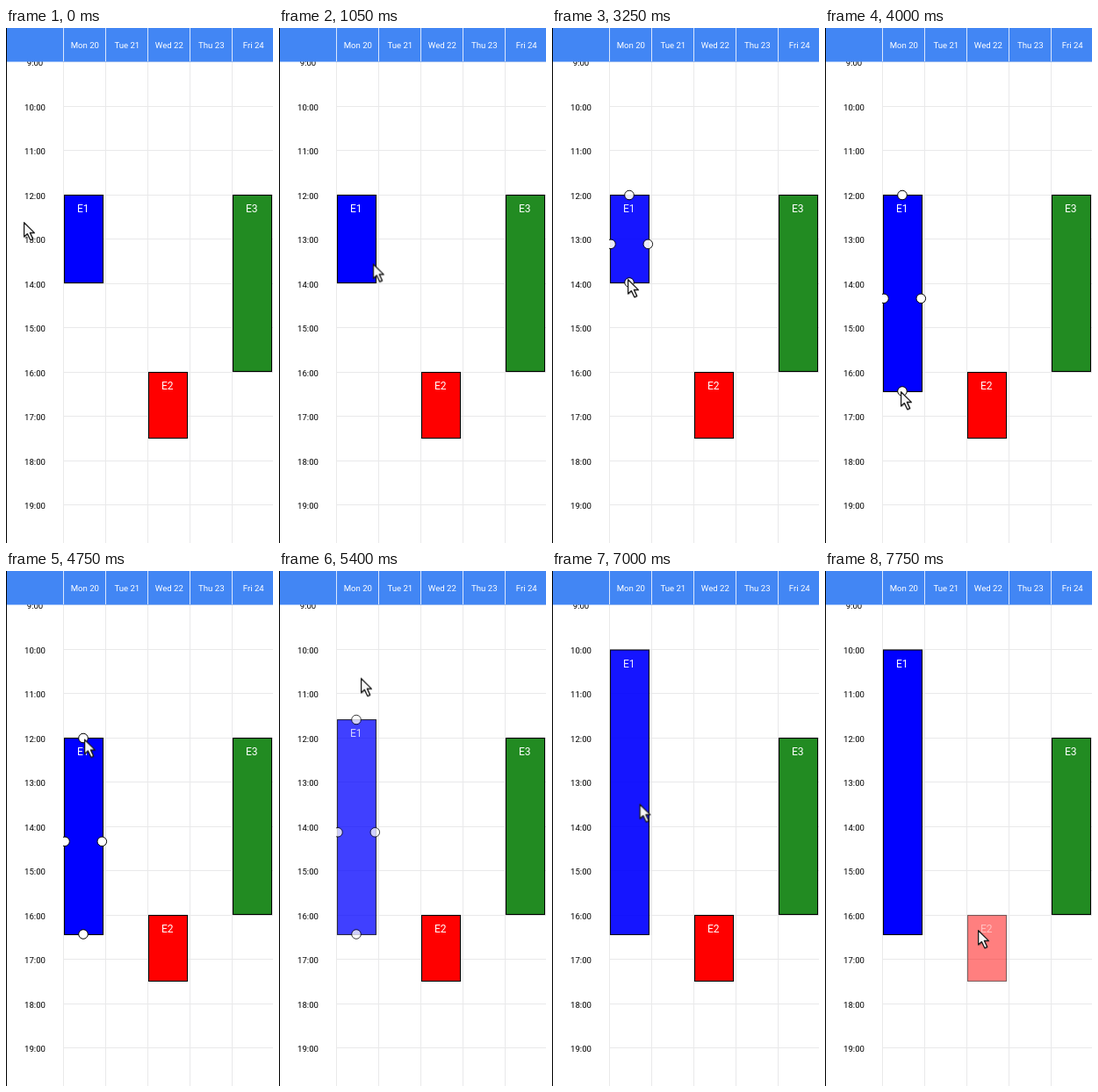
Write an HTML page that moves like this. It is 304x587 px and loops after 8 s.

```html
<!DOCTYPE html>
<html lang="en">
<head>
<meta charset="utf-8">
<title>Week view</title>
<style>
  @property --top { syntax: "<length>"; inherits: true; initial-value: 190.5px; }
  @property --bottom { syntax: "<length>"; inherits: true; initial-value: 290.5px; }
  @property --fade { syntax: "<number>"; inherits: true; initial-value: 1; }

  html, body { margin: 0; width: 100%; height: 100%; overflow: hidden; background: #fff; }
  svg { display: block; width: 304px; height: 587px; }
  text { font-family: Roboto, sans-serif; font-size: 9.6px; text-anchor: middle; }

  .lines { stroke: #e9e9ea; }
  .separators { stroke: #dbe7fd; }
  .event > * { opacity: var(--fade); }
  .event text { font-size: 12px; fill: #fff; }
  .frame { fill: none; stroke: #000; stroke-width: 1.1; }

  #e1 {
    animation: resize-top 8s infinite, resize-bottom 8s linear infinite, press-e1 8s linear infinite;
  }
  #e1 rect { y: var(--top); height: calc(var(--bottom) - var(--top)); }
  #e1 text { transform: translateY(calc(var(--top) - 190.5px)); }
  #e2 { animation: press-e2 8s linear infinite; }

  .handles { animation: editing 8s step-end infinite; }
  .handles circle { r: 5.3px; fill: #fff; stroke: #000; opacity: var(--fade); }
  .north { cy: var(--top); }
  .south { cy: calc(var(--bottom) - 0.5px); }
  .side { cy: calc((var(--top) + var(--bottom)) / 2 + 5.8px); }

  #cursor { animation: point 8s ease-in-out infinite; }

  @keyframes resize-top {
    0%, 65.625% { --top: 190.5px; animation-timing-function: ease-in; }
    67.5% { --top: 170px; animation-timing-function: ease-out; }
    71%, 100% { --top: 90px; }
  }
  @keyframes resize-bottom {
    0%, 41.25% { --bottom: 290.5px; animation-timing-function: ease-in-out; }
    46.9%, 100% { --bottom: 414.5px; }
  }
  @keyframes press-e1 {
    0%, 16.25% { --fade: 1; }
    20.625%, 28.75% { --fade: .5; }
    33.1%, 40% { --fade: 1; }
    43.75%, 46.25% { --fade: .5; }
    50%, 65.625% { --fade: 1; }
    69.375%, 73.125% { --fade: .5; }
    76.875%, 80.625% { --fade: 1; }
    84.375% { --fade: .5; }
    88.125%, 100% { --fade: 1; }
  }
  @keyframes press-e2 {
    0%, 93.75% { --fade: 1; }
    96.875%, 100% { --fade: .5; }
  }
  @keyframes editing {
    0% { visibility: hidden; }
    29.375% { visibility: visible; }
    84.375%, 100% { visibility: hidden; }
  }
  @keyframes point {
    0%, 6.875% { transform: translate(20px, 221px); }
    11.5% { transform: translate(129px, 284px); }
    15%, 30.6% { transform: translate(79px, 249px); }
    35%, 40% { transform: translate(86px, 282px); }
    40.625% { transform: translate(86px, 286px); }
    46.25%, 51.875% { transform: translate(86px, 414px); animation-timing-function: ease-in; }
    55.6% { transform: translate(110px, 300px); animation-timing-function: ease-out; }
    59.375%, 61.875% { transform: translate(89px, 191.5px); }
    63.125%, 64.375% { transform: translate(89px, 186px); animation-timing-function: ease-in; }
    67.5% { transform: translate(93px, 122px); animation-timing-function: ease-out; }
    70.625%, 73.125% { transform: translate(93px, 77px); }
    77.5%, 85.6% { transform: translate(77px, 222px); }
    91.25% { transform: translate(171px, 403px); }
    92.5%, 100% { transform: translate(174px, 409px); }
  }
</style>
</head>
<body>
<svg viewBox="0 0 304 587">
  <clipPath id="columns"><path d="M65 38H304V587H65Z"/></clipPath>

  <path class="lines" id="grid"/>
  <g id="hours"></g>

  <g clip-path="url(#columns)">
    <g class="event" id="e1">
      <rect x="66.5" width="44" fill="#00f"/>
      <rect class="frame" x="66.5" width="44"/>
      <text x="87.7" y="210">E1</text>
      <g class="handles" style="opacity:1">
        <circle class="north" cx="88"/>
        <circle class="side" cx="67"/>
        <circle class="side" cx="109.3"/>
        <circle class="south" cx="88"/>
      </g>
    </g>
    <g class="event" id="e2">
      <rect x="162.5" y="392.5" width="44" height="75" fill="#f00"/>
      <rect class="frame" x="162.5" y="392.5" width="44" height="75"/>
      <text x="183.7" y="412">E2</text>
    </g>
    <g class="event">
      <rect x="258.5" y="190.5" width="44" height="201" fill="#228b22"/>
      <rect class="frame" x="258.5" y="190.5" width="44" height="201"/>
      <text x="279.7" y="210">E3</text>
    </g>
  </g>

  <rect width="304" height="38.5" fill="#4286f4"/>
  <path class="separators" id="separators"/>
  <g id="days" fill="#fff"></g>
  <path d="M.5 0V587" stroke="#000"/>

  <g id="cursor">
    <path d="M1.5 2V18.5L5.2 15.2 8.6 22 11.6 20.6 8.5 14H13.5Z" fill="#000" opacity=".25"/>
    <path d="M.6 .8V17L4.4 13.6 7.8 20.8 10.7 19.4 7.4 12.4H12.3Z"
          fill="#f6f6f6" stroke="#1c1c1c" stroke-width="1.3" stroke-linejoin="round"/>
  </g>
</svg>
<script>
  const byId = id => document.getElementById(id);
  const label = (x, y, text) => `<text x="${x}" y="${y}">${text}</text>`;

  const days = ["Mon 20", "Tue 21", "Wed 22", "Thu 23", "Fri 24"];
  const hours = Array.from({ length: 11 }, (_, i) => 9 + i);
  const columnX = i => 65.5 + 48 * i;
  const hourY = h => 190.2 + 50.5 * (h - 12);
  const snap = y => Math.floor(y) + .5;

  byId("grid").setAttribute("d",
    hours.map(h => `M65 ${snap(hourY(h))}H304`).join("") +
    days.map((_, i) => `M${columnX(i)} 38V587`).join(""));
  byId("separators").setAttribute("d", days.map((_, i) => `M${columnX(i)} 0V38`).join(""));
  byId("hours").innerHTML = hours.map(h => label(33, hourY(h) + 4.7, `${h}:00`)).join("");
  byId("days").innerHTML = days.map((day, i) => label(columnX(i) + 24.3, 23.3, day)).join("");
</script>
</body>
</html>
```
